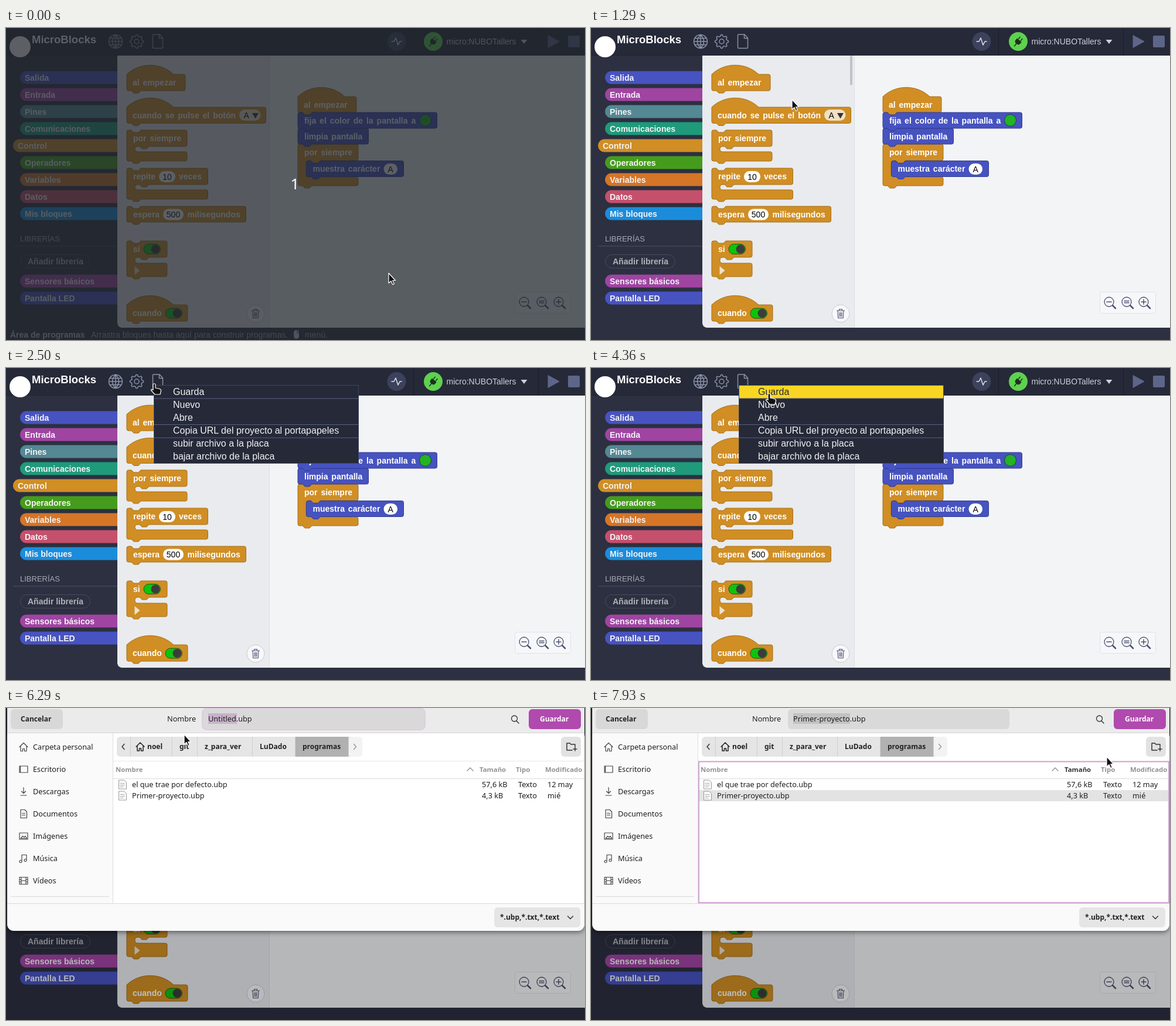
An HTML page for the animation above (8 s loop, 988 by 532 pixels).

```html
<!DOCTYPE html>
<html lang="es">
<head>
<meta charset="utf-8">
<style>
  html, body { margin: 0; width: 100%; height: 100%; overflow: hidden; background: #2c3040; }
  svg { display: block; }
  text { font: 14px "Liberation Sans", Arial, sans-serif; white-space: pre; }
  .b { font-weight: bold; }
  .block { font-weight: bold; word-spacing: 2px; fill: #fff; }
  .menu { font-size: 16px; fill: #f0f1f4; }
  .gtk { font: 12.7px "Noto Sans", sans-serif; fill: #1f1f1f; }
  .gtkb { font: bold 12px "Noto Sans", sans-serif; fill: #222; }
  .head { font: bold 11.4px "Noto Sans", sans-serif; fill: #929292; }
  .line { fill: none; stroke-width: 1.5; stroke-linecap: round; stroke-linejoin: round; }
</style>
</head>
<body>
<svg id="stage" width="988" height="532" viewBox="0 0 988 532"></svg>
<script>
const ORANGE = ['#d08e24', '#a5701b'], BLUE = ['#4653c0', '#333d91'];

// ---- Drawing helpers
const rect = (x, y, w, h, fill, r = 0, extra = '') =>
  `<rect x="${x}" y="${y}" width="${w}" height="${h}" rx="${r}" fill="${fill}" ${extra}/>`;
const circle = (x, y, r, fill, extra = '') => `<circle cx="${x}" cy="${y}" r="${r}" fill="${fill}" ${extra}/>`;
const path = (d, fill, extra = '') => `<path d="${d}" fill="${fill}" ${extra}/>`;
const line = (d, color, extra = '') => `<path class="line" d="${d}" stroke="${color}" ${extra}/>`;
const text = (x, y, s, cls = '', extra = '') => `<text x="${x}" y="${y}" class="${cls}" ${extra}>${s}</text>`;
const group = (id, body, extra = '') => `<g id="${id}" ${extra}>${body}</g>`;
const at = (x, y, body) => `<g transform="translate(${x} ${y})">${body}</g>`;

// ---- Blocks
const notch = x => `H${x + 8}l4 4h8l4 -4`;
const tab = (x, y) => `L${x + 24} ${y}l-4 4h-8l-4 -4`;
const edge = (r, y, b) => `H${r - 3}q3 0 3 3V${b - 3}q0 3 -3 3`;
const shape = (d, [fill, stroke]) => path(d, fill, `stroke="${stroke}"`);
const hat = (x, y, r, b) =>
  shape(`M${x} ${y}C${x + 22} ${y - 21} ${x + 58} ${y - 21} ${x + 80} ${y}${edge(r, y, b)}${tab(x, b)}H${x + 3}q-3 0 -3 -3Z`, ORANGE);
const command = (x, y, r, b, colors) =>
  shape(`M${x} ${y + 3}q0 -3 3 -3${notch(x)}${edge(r, y, b)}${tab(x, b)}H${x + 3}q-3 0 -3 -3Z`, colors);
const loop = (x, y, r, foot, b) => {
  const top = y + 28, in_ = x + 14;
  return shape(`M${x} ${y + 3}q0 -3 3 -3${notch(x)}${edge(r, y, top)}${tab(in_, top)}H${in_ + 4}q-4 0 -4 4V${foot - 4}q0 4 4 4`
    + `${edge(r, foot, b)}${tab(x, b)}H${x + 3}q-3 0 -3 -3Z`, ORANGE);
};
const word = (x, y, s) => text(x, y, s, 'block');
const pill = (x, y, w, s, fill = '#fff') =>
  rect(x, y, w, 19, fill, 9.5) + text(x + w / 2, y + 14.5, s, '', 'text-anchor="middle"');
const toggle = (x, y) => rect(x, y, 28.5, 17, '#0dc40d', 8.5, 'stroke="#26511c"') + circle(x + 20, y + 8.5, 7.5, '#3c3c3c');

const palette = () =>
  hat(206, 79, 306, 107) + word(216, 98, 'al empezar')
  + hat(206, 135, 443.5, 162.5) + word(216, 154, 'cuando se pulse el botón')
  + rect(398, 139, 36.5, 19, '#efe0c6', 9.5) + text(405.5, 154, 'A') + path('M420 145h11l-5.500 9.500z', '#333')
  + loop(206, 174, 309, 211, 227) + word(217, 193, 'por siempre')
  + loop(206, 239, 344.5, 276, 292) + word(217, 258, 'repite') + pill(261, 244, 28, '10') + word(295, 258, 'veces')
  + command(206, 304, 409.5, 331, ORANGE) + word(217, 323, 'espera') + pill(268, 308.5, 35, '500') + word(309.5, 323, 'milisegundos')
  + loop(206, 363, 275, 401, 424) + word(217, 382, 'si') + toggle(235, 368.5) + path('M219.500 406v15l9 -7.500z', '#f0e2cb')
  + hat(206, 472, 310, 500) + word(216, 491, 'cuando') + toggle(272, 478);

const script = () =>
  hat(498, 117, 598, 144) + word(508, 136, 'al empezar')
  + loop(498, 198, 601, 254, 269) + word(509, 217, 'por siempre')
  + command(512.5, 226.5, 678.5, 253.5, BLUE) + word(523.5, 245, 'muestra carácter') + pill(644.5, 231, 23.5, 'A')
  + command(498, 171, 618.5, 198, BLUE) + word(509, 190, 'limpia pantalla')
  + command(498, 144, 735.5, 171, BLUE) + word(509, 163, 'fija el color de la pantalla a')
  + circle(715.5, 157.5, 10, '#23b323', 'stroke="#1d3a4a"');

// ---- Editor chrome
const category = (name, y, color, x = 24) =>
  path(`M190 ${y - 11}H${x + 11}a11 11 0 0 0 0 22H190Z`, color) + text(x + 8, y + 5, name, 'b', 'fill="#f3f3f6"');

const sidebar = () => {
  const names = ['Salida', 'Entrada', 'Pines', 'Comunicaciones', 'Control', 'Operadores', 'Variables', 'Datos', 'Mis bloques'];
  const colors = ['#4753c1', '#a044a2', '#548893', '#1f9a7a', '#d08e24', '#459c1c', '#d57527', '#c5506b', '#1b8cdb'];
  return names.map((n, i) => category(n, 84.5 + 29 * i, colors[i], i === 4 ? 12 : 24)).join('')
    + text(24, 364, 'LIBRERÍAS', '', 'style="font-size:13px" fill="#a6abb9"') + rect(12, 371, 178, 2, '#3c4155')
    + rect(24.5, 386.5, 119, 23, 'none', 11.5, 'stroke="#474c5e"') + text(37, 403, 'Añadir librería', 'b', 'fill="#b0b1b8"')
    + category('Sensores básicos', 431.5, colors[1]) + category('Pantalla LED', 460.5, colors[0]);
};

const gear = () => {
  let d = '';
  for (let i = 0; i < 32; i++) {
    const a = (i - .5) * Math.PI / 16, r = i % 4 < 2 ? 11.5 : 9;
    d += `${i ? 'L' : 'M'}${(r * Math.cos(a)).toFixed(1)} ${(r * Math.sin(a)).toFixed(1)}`;
  }
  return at(223, 23, line(d + 'Z', '#8a92a8') + circle(0, 0, 4, 'none', 'stroke="#8a92a8" stroke-width="1.5"'));
};

const topbar = () =>
  rect(0, 0, 988, 46, '#262938') + rect(0, 46, 988, 1, '#20232f')
  + circle(24, 32, 18, '#fff')
  + text(44, 26, 'MicroBlocks', 'b', 'style="font-size:18.5px" fill="#fff"')
  + at(187, 23, line('M-11.500 0a11.500 11.500 0 1 0 23 0a11.500 11.500 0 1 0 -23 0H11.500M0 -11.500V11.500M0 -11.500q-11 11.500 0 23q11 -11.500 0 -23M-10 -5.500H10M-10 5.500H10', '#8a92a8'))
  + gear()
  + line('M250.500 12.500q0 -1.500 1.500 -1.500h10l5.500 6v16q0 1.500 -1.500 1.500h-14q-1.500 0 -1.500 -1.500zM261.500 11.500v6h6', '#8a92a8')
  + circle(666.5, 23, 16, '#3c425c') + line('M658 23h4l3 -6l4 12l3 -6h3', '#dfe2ec')
  + rect(695, 0, 1, 46, '#1a1d29') + rect(908, 0, 1, 46, '#1a1d29')
  + circle(729, 23, 16, '#5ed14e')
  + at(729, 23, `<g transform="rotate(40)">${path('M-5 -3H5V1Q5 5 0 5Q-5 5 -5 1Z', '#19311a')}${line('M-2.500 -4v-4M2.500 -4v-4M0 5v5', '#19311a')}</g>`)
  + text(751.5, 28, 'micro:NUBOTallers', '', 'fill="#ccd0dc"') + path('M878.500 20h11l-5.500 7z', '#ccd0dc')
  + path('M925 12.500v21l19 -10.500z', '#5d6688', 'stroke="#5d6688" stroke-linejoin="round"') + rect(959, 13, 20, 20, '#5d6688', 2);

const magnifier = (x, mark) => at(x, 467, circle(0, 0, 8, 'none', 'stroke="#4c5270" stroke-width="1.3"') + line('M6 6l5 5', '#4c5270', 'style="stroke-width:2.500"') + line(mark, '#4c5270'));

const workspace = () =>
  path('M190 47H988V511H200q-10 0 -10 -10Z', '#f3f4f6') + path('M190 47H449V511H200q-10 0 -10 -10Z', '#e9ebee')
  + rect(449, 47, 1, 464, '#dcdfe3') + palette() + script()
  + circle(426, 487, 15, '#f7f8fa', 'stroke="#c6cad2"')
  + line('M419.500 482h13M423.500 482v-2.500h5v2.500M421 482l.7 12.500h8.600l.7 -12.500M424 485v7M426 485v7M428 485v7', '#4c5270', 'style="stroke-width:1.1"')
  + rect(868.5, 450.5, 95, 36, '#f6f7f9', 3, 'stroke="#dfe2e6"')
  + magnifier(884, 'M-4 0h8') + magnifier(914, 'M-4 -1.500h8M-4 1.500h8') + magnifier(943, 'M-4 0h8M0 -4v8');

const menu = () => {
  const items = ['Nuevo', 'Abre', 'Copia URL del proyecto al portapapeles', 'subir archivo a la placa', 'bajar archivo de la placa'];
  return rect(252.5, 29.5, 349, 133, '#262938', 0, 'stroke="#3d4560"')
    + [51.5, 96, 118.5].map(y => rect(253, y, 348, 1, '#596180')).join('')
    + items.map((s, i) => text(285, 68 + 22.1 * i, s, 'menu')).join('')
    + rect(253, 30, 348, 21.5, '#fad624', 0, 'id="highlight"') + text(285, 46, 'Guarda', 'menu', 'id="save"');
};

// ---- Save dialog
const fileRow = (y, name, size, date) =>
  path(`M192.500 ${y - 7.5}h9l4 4v11h-13z`, '#fafafa', 'stroke="#999"') + line(`M195 ${y - 2}h7M195 ${y + 1}h7M195 ${y + 4}h5`, '#aaa', 'style="stroke-width:1"')
  + [[215, name], [812, size], [874, 'Texto'], [924, date]].map(([x, s]) => text(x, y + 4.5, s, 'gtk')).join('');

const house = 'M-7 0l7 -7l7 7M-5 -1v8h3.500v-4h3v4h3.500v-8';

const dialog = () => {
  const places = ['Carpeta personal', 'Escritorio', 'Descargas', 'Documentos', 'Imágenes', 'Música', 'Vídeos'];
  const icons = [house, 'M-7 -5.500h14v11h-14zM-5.500 -5v10', 'M0 -7v10M-3.500 -.5l3.500 3.500l3.500 -3.500M-5 6.500h10',
    'M-5 -7h7l3.500 3.500v10.500h-10.500zM-2.500 -1h5M-2.500 2h5', 'M-7 -5.500h14v11h-14zM-5 4l3.500 -4l2.500 2l2 -2l2.500 4z',
    'M-3 5v-11h8v9M-3 5a2 2 0 1 1 -1 -1.500M5 3a2 2 0 1 1 -1 -1.500', 'M-7 -6h14v12h-14zM-4 -6v12M4 -6v12M-4 0h8M-7 -2h3M-7 2h3M4 -2h3M4 2h3'];
  const crumbs = [[241, 'noel'], [296, 'git'], [339, 'z_para_ver'], [433, 'LuDado'], [506, 'programas']];
  return rect(2, -10, 985, 390, '#fafafa', 11, 'filter="drop-shadow(0 2px 4px #0008)"')
    + rect(2, 0, 985, 42, '#ebebeb') + rect(2, 42, 985, 1, '#d6d6d6')
    + rect(183, 43, 804, 290, '#fff') + rect(182, 43, 1, 290, '#dedede') + rect(2, 333, 985, 1, '#d9d9d9')
    + rect(8, 2, 89, 34, '#d8d8d8', 6) + text(25, 23, 'Cancelar', 'gtkb')
    + text(275, 23, 'Nombre', 'gtk') + rect(336, 2, 378, 34, '#d9d9d9', 6)
    + rect(0, 0, 0, 0, 'none', 7, 'id="entryRing" stroke="#cfa3d2" stroke-width="2"')
    + rect(345, 9, 49, 18, '#c9b2cc', 0, 'id="marked"') + text(345, 23, '', 'gtk', 'id="filename"')
    + circle(867.5, 18, 5, 'none', 'stroke="#333" stroke-width="1.3"') + line('M871 22l4 4', '#333')
    + rect(892, 2, 89, 34, '#b04aae', 6) + text(911, 23, 'Guardar', 'gtkb', 'style="fill:#fff"')
    + places.map((s, i) => text(46, 71 + 38 * i, s, 'gtk') + at(30, 66.5 + 38 * i, line(icons[i], '#444', 'style="stroke-width:1.2"'))).join('')
    + rect(8, 321, 168, 1, '#d9d9d9')
    + rect(189, 49, 419, 34, '#e5e5e5', 6) + rect(584, 49, 24, 34, '#f3f3f3', 6) + rect(493, 49, 91, 34, '#b1b1b1')
    + [212, 283, 326, 420, 493, 584].map(x => rect(x, 49, 1, 34, '#cfcfcf')).join('')
    + line('M202 61.500l-4 4.500l4 4.500', '#333') + line('M593.500 61.500l4 4.500l-4 4.500', '#999')
    + at(229, 66, line(house, '#222')) + crumbs.map(([x, s]) => text(x, 70, s, 'gtkb')).join('')
    + rect(947, 49, 34, 34, '#e2e2e2', 6) + line('M966 72h-9v-12h5l2 2h7v4M968 70h6M971 67v6', '#333')
    + rect(183, 90, 804, 1, '#e8e8e8') + rect(183, 120, 804, 1, '#dcdcdc')
    + rect(185, 140, 801, 19, '#e3e3e3', 0, 'id="selected"')
    + text(187, 108.5, 'Nombre', 'head', 'id="headName"') + line('M787 107l5 -5l5 5', '#888', 'style="stroke-width:1.2"')
    + text(808, 108.5, 'Tamaño', 'head', 'id="headSize"') + text(870, 108.5, 'Tipo', 'head') + text(920, 108.5, 'Modificado', 'head')
    + fileRow(130.5, 'el que trae por defecto.ubp', '57,6 kB', '12 may') + fileRow(149.5, 'Primer-proyecto.ubp', '4,3 kB', 'mié')
    + rect(184, 91.5, 802, 240.5, 'none', 0, 'id="listRing" stroke="#d2a6d4" stroke-width="2"')
    + rect(833, 340, 147, 34, '#e5e5e5', 6) + text(843, 361, '*.ubp,*.txt,*.text', 'gtkb') + line('M958.500 355l4.500 4.500l4.500 -4.500', '#333');
};

const status = () =>
  text(7, 527.5, 'Área de programas', 'b', 'fill="#c5c8d2"') + text(145, 527.5, 'Arrastra bloques hasta aquí para construir programas.', '', 'fill="#a5aab8"')
  + rect(491, 515, 9, 15, '#ccd0da', 4.5) + rect(496, 515, 4, 6, '#5b8bd0', 2) + text(510, 527.5, 'menú.', '', 'fill="#a5aab8"');

const pointer = 'fill="#111" stroke="#fff" stroke-width="1.2" stroke-linejoin="round"';
document.getElementById('stage').innerHTML =
  rect(0, 0, 988, 532, '#2c3040') + topbar() + sidebar() + workspace()
  + rect(442, 47, 4, 50.5, '#c0c2c7', 2, 'id="scrollbar"') + group('status', status()) + group('menu', menu())
  + rect(0, 0, 988, 532, '#000', 0, 'id="dim"') + group('dialog', dialog())
  + group('countdown', rect(0, 0, 988, 532, '#20252c', 0, 'opacity=".73"')
    + text(493, 275, '1', '', 'text-anchor="middle" style="font:26px Noto Sans,sans-serif" fill="#fff"'))
  + group('cursor', `<path id="arrow" d="M0 0V17L4 13.500L6.800 19.500L9.300 18.300L6.700 12.500H11.500Z" ${pointer}/>`
    + `<path id="hand" d="M-2 1Q0 -2 2 1V7L9 8.500Q12 9.500 11.500 12L10 18H1L-5.500 11Q-5 8 -2 10.500Z" ${pointer}/>`);

// ---- Timeline
const $ = id => document.getElementById(id);
const set = (id, attrs) => { for (const k in attrs) $(id).setAttribute(k, attrs[k]); };
const show = (id, on) => set(id, { opacity: +on });
const ramp = (t, a, b) => Math.min(1, Math.max(0, (t - a) / (b - a)));

// time, x, y of the pointer
const track = [[0, 653, 418], [140, 654, 422], [570, 654, 422], [1290, 343, 122], [1430, 341, 119], [1930, 253, 27], [3140, 253, 27],
  [3430, 290, 42], [4140, 290, 42], [4360, 304, 44], [6570, 304, 45], [7070, 319, 146], [7140, 319, 146], [7210, 304, 146], [7570, 304, 146], [7930, 880, 83]];

function pointerAt(t) {
  const i = track.findIndex(k => k[0] > t);
  if (i < 0) return track.at(-1).slice(1);
  const [t0, x0, y0] = track[i - 1], [t1, x1, y1] = track[i];
  const p = ramp(t, t0, t1), e = p * p * (3 - 2 * p);
  return [x0 + (x1 - x0) * e, y0 + (y1 - y0) * e];
}

function draw() {
  const now = performance.now() % 8000, t = Math.floor((now + 4) * .014) / .014;
  const [x, y] = pointerAt(t), picked = t >= 7350;
  const hand = t >= 1850 && t < 3060 || t >= 4270 && t < 5920;
  set('cursor', { transform: `translate(${x.toFixed(1)} ${y.toFixed(1)})` });
  show('arrow', !hand);
  show('hand', hand);
  show('countdown', 0);
  set('countdown', { opacity: 1 - ramp(t, 0, 140) });
  show('status', t < 850);
  show('scrollbar', t < 1700 && x < 449 && y > 47);
  show('menu', t >= 2490 && t < 6200);
  const hot = t >= 3270;
  show('highlight', hot);
  $('save').style.fill = hot ? '#262938' : '';

  const open = ramp(t, 6130, 6270);
  show('dialog', open);
  set('dim', { opacity: .25 * open });
  const grow = 2 * (1 - ramp(t, 6280, 6500));
  set('entryRing', { x: 337 - grow, y: 3 - grow, width: 376 + 2 * grow, height: 32 + 2 * grow, opacity: picked ? 0 : 1 - .3 * grow });
  $('filename').textContent = picked ? 'Primer-proyecto.ubp' : 'Untitled.ubp';
  set('marked', { width: picked ? 97 : 49, fill: picked ? '#c2c2c2' : '#c9b2cc' });
  show('selected', picked);
  set('listRing', { opacity: ramp(t, 7280, 7500) });
  const overHead = y > 91 && y < 120;
  $('headName').style.fill = overHead && x < 797 ? '#333' : '';
  $('headSize').style.fill = t >= 7850 ? '#333' : '';
  requestAnimationFrame(draw);
}
draw();
</script>
</body>
</html>
```
